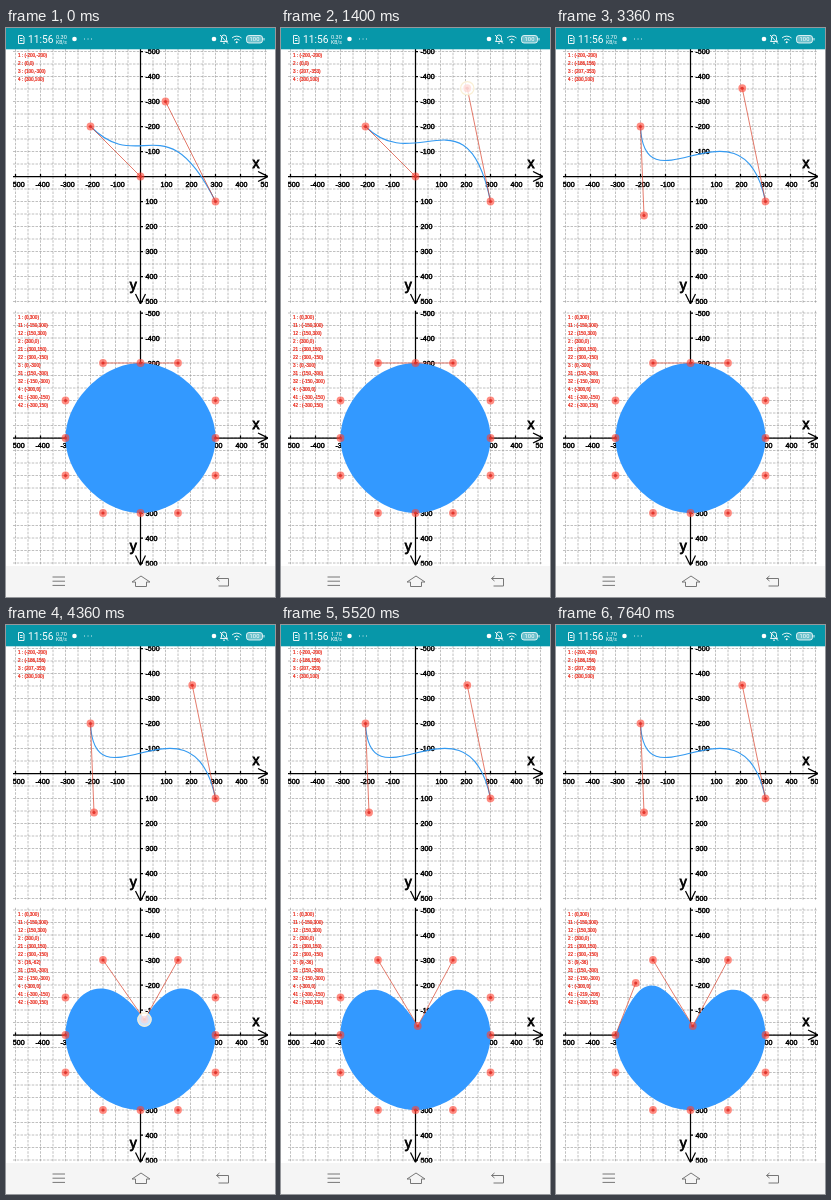
Recreate the animation shown at these times as an HTML page. Size 269 by 569 pixels, loop 8000 ms.

```html
<!DOCTYPE html>
<html lang="en">
<head>
<meta charset="utf-8">
<title>Bezier control points</title>
<style>
  html, body { margin: 0; width: 100%; height: 100%; overflow: hidden; background: #fff; }
  svg { display: block; width: 100vw; height: 100vh; }
  text { font-family: "Liberation Sans", Arial, sans-serif; white-space: pre; }
  .bar text { font-family: Roboto, sans-serif; fill: #fff; }
  .grid { fill: none; stroke: #8c8c8c; stroke-width: .55; stroke-dasharray: 2.5 1.25; }
  .axis { fill: none; stroke: #000; stroke-width: 1.25; }
  .num { font-size: 7.1px; stroke: #000; stroke-width: .45; }
  .name { font-size: 14px; stroke: #000; stroke-width: .8; }
  .list { font-size: 4.6px; fill: #e8281a; stroke: #e8281a; stroke-width: .22; }
  .handle { fill: none; stroke: #d9442f; stroke-width: .7; }
  .icon { fill: none; stroke: #fff; stroke-width: .9; }
  .solid { fill: #fff; }
  .nav { fill: none; stroke: #777; stroke-width: 1; stroke-linejoin: round; }
</style>
</head>
<body>
<svg viewBox="0 0 269 569">
  <rect width="269" height="569" fill="#fff"/>
  <g id="charts"></g>
  <g class="bar">
    <rect width="269" height="21.3" fill="#0797a9"/>
    <path class="icon" d="M12.5 7.5h4l1.5 1.5v6.5h-5.5zM14 12.5h2.5M14 10.5h2.5"/>
    <text x="22" y="15" font-size="10.2">11:56</text>
    <text id="speed" x="50" y="10.6" font-size="5.6"></text>
    <text x="50" y="15.8" font-size="5">KB/s</text>
    <circle class="solid" cx="68.5" cy="11" r="2.3"/>
    <path class="icon" stroke-width="1.8" stroke-linecap="round" d="M78.5 11h.1M82 11h.1M85.5 11h.1"/>
    <circle class="solid" cx="208" cy="11" r="2.3"/>
    <path class="icon" d="M214.5 13.5h7l-1-1.5v-2.5a2.5 2.5 0 0 0-5 0v2.5zM217 15.2h2M214 7l8 8.5"/>
    <path class="icon" d="M226 10a7 7 0 0 1 9.5 0M228 12.2a4 4 0 0 1 5.5 0"/>
    <circle class="solid" cx="230.7" cy="14.3" r="1"/>
    <rect x="240.5" y="7.5" width="16" height="7.5" rx="2.5" fill="#fff" fill-opacity=".4" stroke="#fff" stroke-width=".8"/>
    <path class="icon" d="M258 10v2.5"/>
    <text x="248.5" y="13.3" font-size="5.8" text-anchor="middle">100</text>
  </g>
  <rect y="538" width="269" height="31" fill="#f5f5f5"/>
  <path class="nav" d="M46.5 549h12.5M46.5 553.2h12.5M46.5 557.4h12.5"/>
  <path class="nav" d="M126 554l9-6 9 6h-3.5v4.5h-11v-4.5z"/>
  <path class="nav" d="M213.5 548l-3 2.5 3 2.5M210.5 550.5h12v7.5h-10"/>
  <g id="touch">
    <circle r="7.2" fill="#fff" fill-opacity=".75"/>
    <circle r="6.7" fill="none" stroke="#f8edcf" stroke-opacity=".9" stroke-width="1.2"/>
  </g>
</svg>
<script>
const LOOP = 8000, CX = 134.5, HALF = 127.5, UNIT = 0.25;
const charts = document.getElementById("charts");
const touch = document.getElementById("touch");
const speed = document.getElementById("speed");

function add(parent, tag, attrs, text) {
  const el = document.createElementNS("http://www.w3.org/2000/svg", tag);
  for (const k in attrs) el.setAttribute(k, attrs[k]);
  if (text !== undefined) el.textContent = text;
  parent.appendChild(el);
  return el;
}

function drawCoords(g, cy, id) {
  const left = CX - HALF, right = CX + HALF, top = cy - HALF, bottom = cy + HALF;
  const clip = add(g, "clipPath", { id });
  add(clip, "rect", { x: left, y: top, width: 2 * HALF, height: 2 * HALF });
  const c = add(g, "g", { "clip-path": `url(#${id})` });

  let grid = "";
  for (let v = -500; v <= 500; v += 50) {
    const d = v * UNIT;
    grid += `M${left} ${cy + d}H${right}M${CX + d} ${top}V${bottom}`;
  }
  add(c, "path", { class: "grid", d: grid });

  let axis = `M${left} ${cy}H${right}M${right - 10} ${cy - 5}l10 5l-10 5`
           + `M${CX} ${top}V${bottom}M${CX - 5} ${bottom - 10}l5 10l5 -10`;
  for (let v = -500; v <= 500; v += 100) {
    if (!v) continue;
    const d = v * UNIT;
    axis += `M${CX + d} ${cy}v-2.5M${CX} ${cy + d}h2.5`;
    add(c, "text", { class: "num", x: CX + d - 5, y: cy + 10 }, v);
    add(c, "text", { class: "num", x: CX + 5, y: cy + d + 2.5 }, v);
  }
  add(c, "path", { class: "axis", d: axis });
  add(c, "text", { class: "name", x: right - 15.5, y: cy - 8.8 }, "x");
  add(c, "text", { class: "name", x: CX - 10.8, y: bottom - 14.2 }, "y");
}

// One chart: coordinates, curve through `order`, handle lines, points and their list.
function makeChart(cy, id, style, points, handles, order) {
  const g = add(charts, "g", {});
  drawCoords(g, cy, id);
  const curve = add(g, "path", style);
  const lines = add(g, "path", { class: "handle" });
  const names = Object.keys(points).sort();
  const dots = {}, rows = {};
  names.forEach((n, i) => {
    dots[n] = add(g, "g", {});
    add(dots[n], "circle", { r: 3.9, fill: "#ff4434", "fill-opacity": 0.62 });
    add(dots[n], "circle", { r: 1.6, fill: "#e03028", "fill-opacity": 0.9 });
    rows[n] = add(g, "text", { class: "list", x: 12, y: cy - 119.3 + 8 * i });
  });

  const place = ([x, y]) => [CX + x * UNIT, cy + y * UNIT];
  const update = moved => {
    const pos = { ...points, ...moved };
    const at = n => place(pos[n]).join(" ");
    curve.setAttribute("d", `M${at(order[0])}C${order.slice(1).map(at).join(" ")}`);
    // Upright handles lie on a grid line and stay hidden.
    lines.setAttribute("d", handles.filter(([a, b]) => pos[a][0] !== pos[b][0])
      .map(([a, b]) => `M${at(a)}L${at(b)}`).join(""));
    for (const n of names) {
      dots[n].setAttribute("transform", `translate(${at(n)})`);
      rows[n].textContent = `${n} : (${pos[n].map(Math.round).join(",")})`;
    }
  };
  return { place, update };
}

const line = makeChart(148.5, "clipA",
  { fill: "none", stroke: "#3399f0", "stroke-width": 1.1 },
  { 1: [-200, -200], 2: [0, 0], 3: [100, -300], 4: [300, 100] },
  [["1", "2"], ["3", "4"]], ["1", "2", "3", "4"]);

// Four anchors with two handles each, every set a quarter turn after the last.
const ring = {}, ringOrder = ["1"];
let corner = { "": [0, 300], 1: [-150, 300], 2: [150, 300] };
for (let k = 1; k <= 4; k++) {
  const next = k % 4 + 1;
  for (const s in corner) {
    const [x, y] = corner[s];
    ring[k + s] = [x, y];
    corner[s] = [y, -x];
  }
  ringOrder.push(k + "2", next + "1", String(next));
}
const shape = makeChart(410, "clipB", { fill: "#3399ff" }, ring,
  [["3", "31"], ["3", "32"], ["4", "41"]], ringOrder);

// A finger drags a point from rest, bending past `via`, and slows down at the end.
const drags = [
  { chart: line, point: "3", start: 160, end: 1300, up: 1600, from: [100, -300], via: [155, -335], to: [207, -353] },
  { chart: line, point: "2", start: 1840, end: 2960, up: 3340, from: [0, 0], via: [-86, 92], to: [-186, 156] },
  { chart: shape, point: "3", start: 3680, end: 5000, up: 5480, from: [0, -300], via: [28, -50], to: [9, -36] },
  { chart: shape, point: "41", start: 7000, end: 7480, up: 7620, from: [-300, -150], via: [-262, -180], to: [-219, -208] }
];

function dragAt({ start, end, from, via, to }, t) {
  const p = Math.min(1, Math.max(0, (t - start) / (end - start)));
  const f = Math.sin(p * Math.PI / 2), r = 1 - f;
  return from.map((v, i) => r * r * v + 2 * r * f * via[i] + f * f * to[i]);
}

function render(t) {
  const moved = new Map([[line, {}], [shape, {}]]);
  let finger = null;
  for (const d of drags) {
    const p = dragAt(d, t);
    moved.get(d.chart)[d.point] = p;
    if (t >= d.start - 60 && t < d.up) finger = d.chart.place(p);
  }
  moved.forEach((points, chart) => chart.update(points));
  touch.setAttribute("visibility", finger ? "visible" : "hidden");
  if (finger) touch.setAttribute("transform", `translate(${finger.join(" ")})`);
  speed.textContent = t < 2240 ? "0.30" : t < 5300 ? "0.70" : "1.70";
}

const begin = performance.now();
function tick() {
  render((performance.now() - begin) % LOOP);
  requestAnimationFrame(tick);
}
tick();
</script>
</body>
</html>
```
